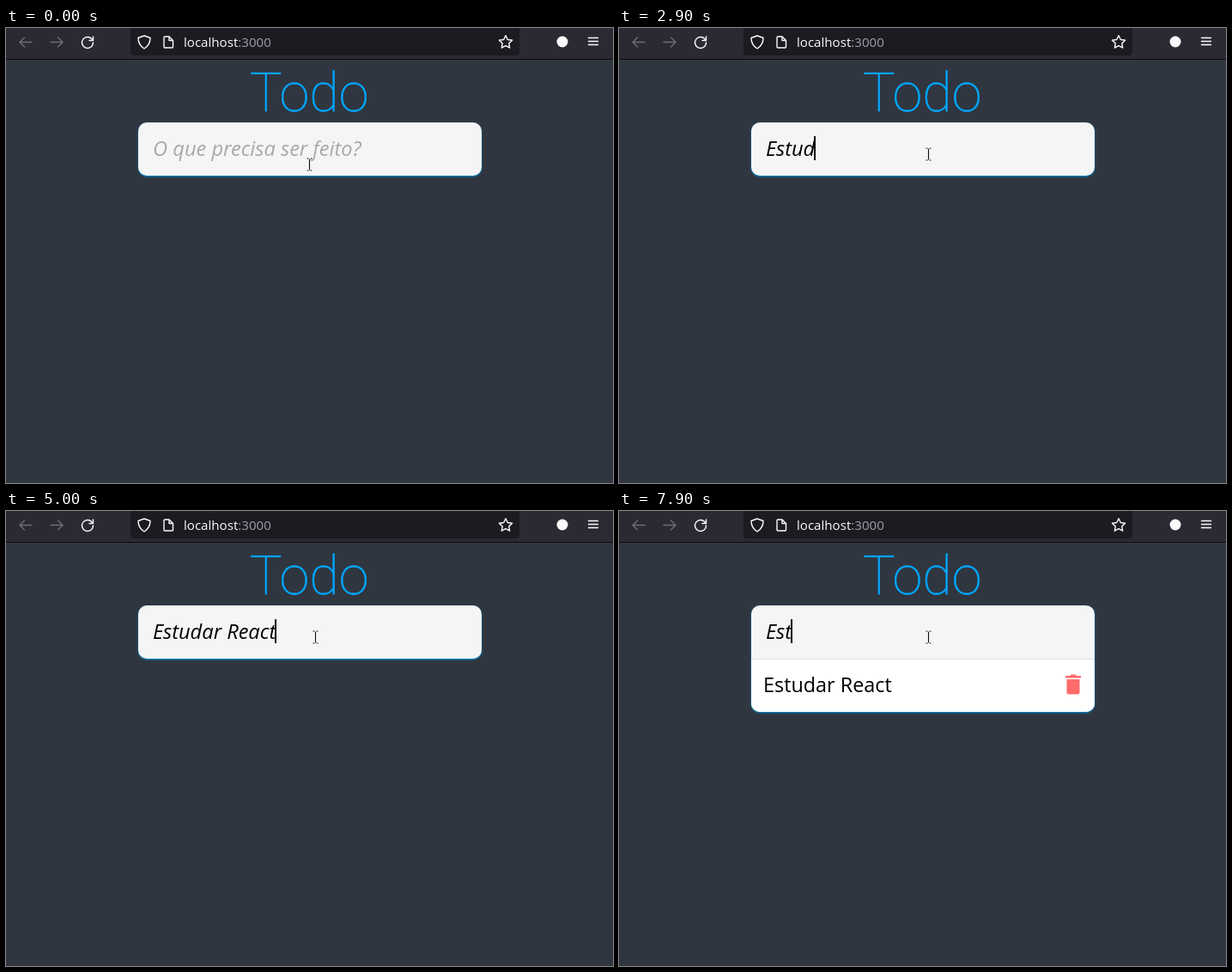
Animation of 707x530 px, one loop 8 s. Source, as an HTML page:

```html
<!DOCTYPE html>
<html lang="pt-BR">
<head>
<meta charset="utf-8">
<title>Todo</title>
<style>
  html, body { margin: 0; width: 100%; height: 100%; overflow: hidden; background: #2f3640; }
  #card {
    position: absolute; left: 154px; top: 110px; width: 400px; height: 62px;
    border-radius: 10px; background: #f5f5f5; box-shadow: 0 1px 2px #0097e6;
  }
  svg { position: absolute; left: 0; top: 0; }
  text { font-family: "Open Sans", "Noto Sans", sans-serif; }
  .title { font: 100 63px Roboto, Lato, sans-serif; fill: #00a8ff; stroke: #00a8ff; stroke-width: .6; }
  .url { font-size: 15.1px; fill: #fbfbfe; }
  .entry { font-size: 23.7px; font-style: italic; }
  .task { font-size: 23.4px; }
  .icon { fill: none; stroke: #fbfbfe; stroke-width: 1.4; stroke-linecap: round; stroke-linejoin: round; }
  .dim { stroke: #6d6c74; }
</style>
</head>
<body>
<div id="card"></div>
<svg width="707" height="530" viewBox="0 0 707 530">
  <!-- browser toolbar -->
  <rect width="707" height="36" fill="#2b2a33"/>
  <rect y="36" width="707" height="1" fill="#0c0c0d"/>
  <path d="M145 0H598V28a4 4 0 0 1-4 4H149a4 4 0 0 1-4-4z" fill="#1c1b22"/>
  <g class="icon">
    <path class="dim" d="M30 16.5H16M21.5 11L16 16.5 21.5 22M52 16.5H66M60.500 11L66 16.500 60.500 22"/>
    <path d="M100.500 13.500A6.500 6.500 0 1 0 101.500 17M101.500 10V14.500H97"/>
    <path d="M161 9L168 11.500C168 17 166 21 161 24 156 21 154 17 154 11.500Z"/>
    <path d="M185 10H190L194.500 14.500V22a1 1 0 0 1-1 1H185a1 1 0 0 1-1-1V11a1 1 0 0 1 1-1ZM190 10V14.500H194.500"/>
    <path id="star"/>
    <path d="M678.500 11.500H689.500M678.500 15.500H689.500M678.500 19.500H689.500"/>
  </g>
  <circle cx="648" cy="16" r="6.5" fill="#fbfbfe"/>
  <text class="url" x="207" y="21.500">localhost<tspan fill="#9f9ea6">:3000</tspan></text>

  <text class="title" x="284" y="97">Todo</text>
  <text class="entry" id="entry" x="171" y="149"></text>

  <g id="task">
    <path d="M154 172H554V224a10 10 0 0 1-10 10H164a10 10 0 0 1-10-10z" fill="#fff"/>
    <rect x="154" y="172" width="400" height="1" fill="#dedede"/>
    <text class="task" x="168" y="211">Estudar React</text>
    <path d="M520 192H525L526.500 190.500H531.500L533 192H538V194.500H520ZM521.500 196H536.500V211a2.500 2.500 0 0 1-2.500 2.500H524a2.500 2.500 0 0 1-2.500-2.500Z" fill="#ff6b6b"/>
  </g>

  <rect id="caret" y="126" width="2" height="28"/>
  <g id="pointer" fill="none">
    <path d="M-3 -7.500H3M-3 7.500H3M0 -7V7" stroke="#fff" stroke-width="3"/>
    <path d="M-3 -7H-1M1 -7H3M-3 7H-1M1 7H3M0 -6.500V6.500" stroke="#111" stroke-width="1.2"/>
  </g>
</svg>
<script>
  const LOOP = 8000, SUBMIT = 5800;
  const PLACEHOLDER = "O que precisa ser feito?";
  // [start ms, typed text, caret visible]
  const steps = [
    [0, "", false], [1000, "", true], [1900, "E", true], [2200, "Es", true],
    [2800, "Estu", true], [2900, "Estud", true], [3200, "Estudar", true],
    [3400, "Estudar", false], [3900, "Estudar R", true], [4100, "Estudar Re", true],
    [4400, "Estudar Rea", true], [4600, "Estudar Reac", true], [5000, "Estudar React", true],
    [SUBMIT, "", true], [7000, "E", true], [7300, "Es", true], [7900, "Est", true]
  ];
  const $ = id => document.getElementById(id);
  const show = (id, on) => $(id).setAttribute("visibility", on ? "visible" : "hidden");

  const starPoints = Array.from({ length: 10 }, (_, i) => {
    const radius = i % 2 ? 3.9 : 8, angle = i * Math.PI / 5;
    return `${582 + radius * Math.sin(angle)} ${16.7 - radius * Math.cos(angle)}`;
  });
  $("star").setAttribute("d", `M${starPoints.join("L")}Z`);

  function draw(time) {
    const [, typed, caretOn] = steps.findLast(([start]) => start <= time);
    const submitted = time >= SUBMIT;
    const entry = $("entry");
    const content = typed || PLACEHOLDER;
    if (entry.textContent !== content) entry.textContent = content;
    entry.setAttribute("fill", typed ? "#000" : "#a9a9a9");

    $("caret").setAttribute("x", Math.round(170 + (typed ? entry.getComputedTextLength() : 0)));
    show("caret", caretOn);
    show("task", submitted);
    $("card").style.height = submitted ? "124px" : "62px";
    $("pointer").setAttribute("transform", time < 600 ? "translate(353.5 159)" : "translate(360.5 147)");
  }

  function tick() {
    draw(performance.now() % LOOP);
    requestAnimationFrame(tick);
  }
  tick();
</script>
</body>
</html>
```
